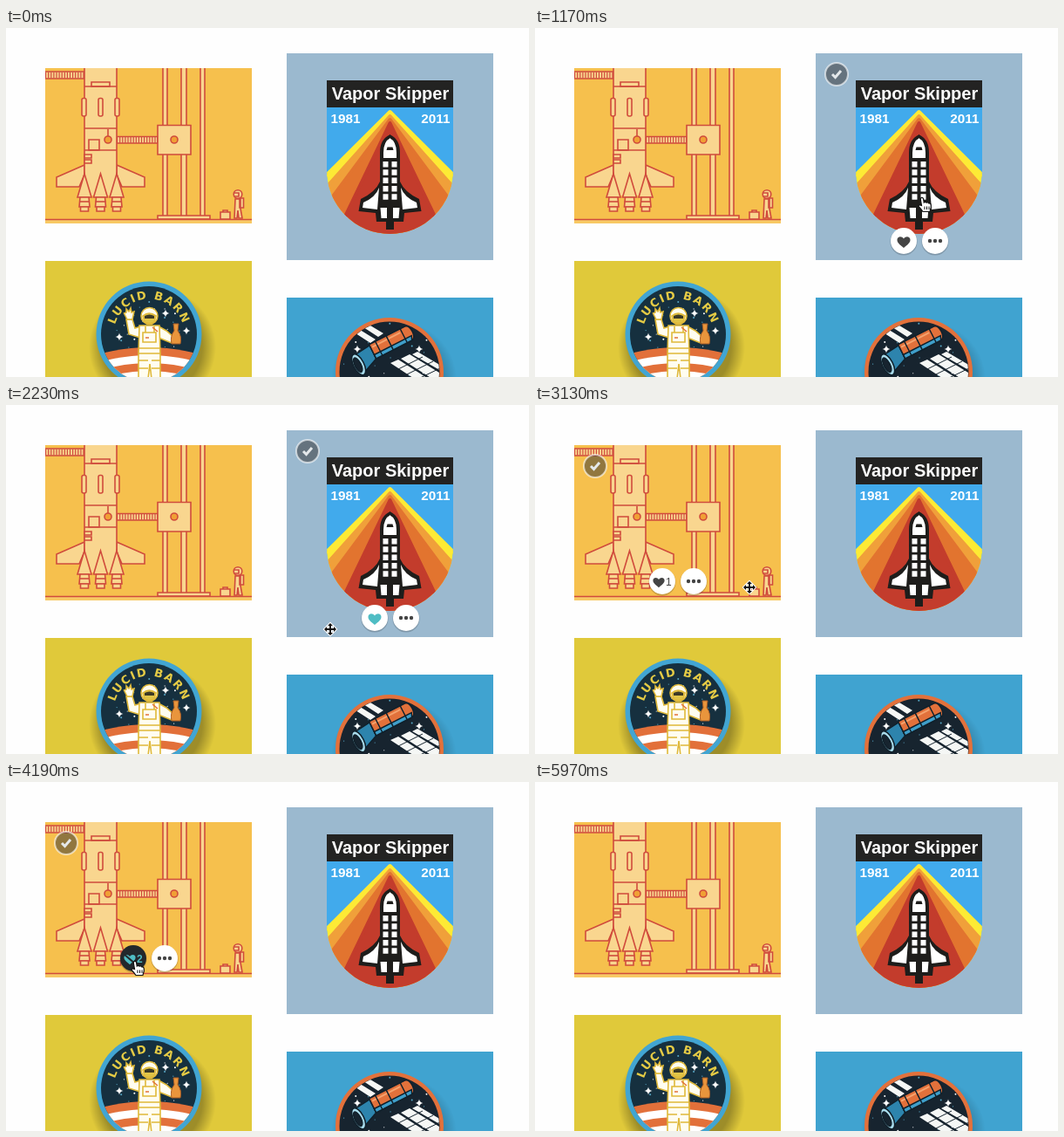
These frames come from a looping animation (600x400 px, 6320 ms). An HTML page:

```html
<!DOCTYPE html>
<html lang="en">
<head>
<meta charset="utf-8">
<title>Pin board</title>
<style>
html, body { margin: 0; height: 100%; overflow: hidden; background: #fefefe }
svg { display: block }
text { font-family: "Liberation Sans", Arial, sans-serif; font-weight: bold }
.wide { font-family: "DejaVu Sans", sans-serif }
.line { stroke: #d04b3c; stroke-width: 1.6; fill: #f9d68f }
.open { fill: none }
.suit { fill: #fffdf0; stroke: #dfb93a; stroke-width: 1.6 }
</style>
</head>
<body>
<svg width="600" height="400" viewBox="0 0 600 400">
<defs>
  <clipPath id="shield"><path d="M368 60H513V163A72.500 73 0 0 1 368 163Z"/></clipPath>
  <clipPath id="camp"><circle cx="164" cy="351" r="55"/></clipPath>
  <clipPath id="scope"><circle cx="440" cy="394" r="57"/></clipPath>
  <clipPath id="pad"><path d="M45 46H282V224H45Z"/></clipPath>
  <path id="arc" d="M123.500 351A40.500 40.500 0 0 1 204.500 351"/>
  <path id="star" d="M0-4.500Q.6-.6 4.500 0 .6.6 0 4.500-.6.6-4.500 0-.6-.6 0-4.500"/>
  <radialGradient id="shade"><stop offset=".78" stop-opacity=".3"/><stop offset="1" stop-opacity="0"/></radialGradient>
  <g id="engine" class="line">
    <path d="M0 167L-8 194H8Z"/><path d="M-5 194H5L6 205H-6Z"/><path d="M-4.500 205H4.500V210H-4.500Z"/>
    <path class="open" d="M-6 199H6"/>
  </g>
  <g id="side">
    <path fill="#1e1d1b" d="M441 122Q429 127 429 143V176Q424 188 407 196L404.500 210 424 212 425 222H436V231H441Z"/>
    <path fill="#fff" d="M441 126Q433 130 433 143V149H441ZM428 183Q424 194 410 200L409 206 426 208ZM429.500 206H437V218H430.500Z"/>
    <path fill="none" stroke="#fff" stroke-width="6" stroke-dasharray="6.500 2.800" d="M435.500 153V199"/>
  </g>
</defs>

<!-- launch pad -->
<g clip-path="url(#pad)">
  <path fill="#f6c04d" d="M45 46H282V224H45Z"/>
  <path fill="#f8c964" d="M45 220H282V224H45Z"/>
  <g class="line">
    <path d="M180 40H185V215H180ZM201 40H207V215H201ZM223 40H228V215H223ZM174 215H234V219H174Z"/>
    <path d="M40 50H90V58H40ZM127 124.500H174V132H127Z"/>
    <path class="open" stroke-width="7" stroke-dasharray="1.200 1.900" d="M45 54H90M127 128.300H174"/>
    <path d="M90 157L58 171V182H84L90 168ZM127 157L159 171V182H133L127 168Z"/>
    <path stroke="none" d="M90 160H127V192H90Z"/>
    <path d="M90 168V40H127V168"/>
    <path d="M98 62H119V67H98ZM95 128H107V140H95ZM90 145H98V149H90ZM90 151H98V155H90Z"/>
    <path class="open" d="M90 67H127M90 115H127M90 140H127M117 116V124"/>
    <rect x="87" y="80.500" width="5" height="20.500" rx="2"/><rect x="106" y="80.500" width="5" height="20.500" rx="2"/><rect x="125" y="80.500" width="5" height="20.500" rx="2"/>
    <path d="M174 111.500H212V145H174Z"/>
    <circle cx="117" cy="128" r="4" fill="#f0a035"/><circle cx="193" cy="128" r="4" fill="#f0a035"/>
    <path class="open" d="M45 219.500H282"/>
    <path d="M246 211H257V219H246ZM249 211V209H254V211"/>
    <path d="M268 195H272.500V206H268ZM263 196H269V207L271 218H267L266 209 265 218H262Z"/>
    <circle cx="266" cy="190.500" r="4.800"/><path class="open" d="M262 189H267V193H262"/>
  </g>
  <use href="#engine" x="90"/><use href="#engine" x="127"/><use href="#engine" x="108.500"/>
</g>

<!-- shield badge -->
<path fill="#9bb9cf" d="M322 29H559V266H322Z"/>
<g clip-path="url(#shield)">
  <path fill="#41aaec" d="M368 60H513V240H368Z"/>
  <g stroke-linejoin="round" stroke-width="4">
    <path fill="#fdea35" stroke="#fdea35" d="M440.500 96L360 176V250H521V176Z"/>
    <path fill="#f0a03a" stroke="#f0a03a" d="M440.500 101L360 191V250H521V191Z"/>
    <path fill="#e2742f" stroke="#e2742f" d="M440.500 105L360 213V250H521V213Z"/>
    <path fill="#c33c2c" stroke="#c33c2c" d="M440.500 109L378 239V250H503V239Z"/>
  </g>
  <path fill="#232322" d="M368 60H513V91H368Z"/>
</g>
<g fill="#fff">
  <text x="441" y="82" font-size="20" text-anchor="middle">Vapor Skipper</text>
  <text x="372.500" y="108.500" font-size="15.300">1981</text>
  <text x="509.500" y="108.500" font-size="15.300" text-anchor="end">2011</text>
</g>
<use href="#side"/><use href="#side" transform="translate(881)scale(-1 1)"/>
<path fill="#1e1d1b" d="M436.500 140L437.500 136.500H443.500L444.500 140Z"/>

<!-- camp badge -->
<path fill="#e0c93a" d="M45 267H282V400H45Z"/>
<ellipse cx="168" cy="366" rx="73" ry="70" fill="url(#shade)"/>
<circle cx="164" cy="351" r="60.500" fill="#42a5d2"/>
<circle cx="164" cy="351" r="55" fill="#16303f"/>
<g clip-path="url(#camp)">
  <g id="dots"></g>
  <g id="hills"></g>
</g>
<text class="wide" font-size="13" letter-spacing="1.600" fill="#e5cb45" text-anchor="middle"><textPath href="#arc" startOffset="50%">LUCID BARN</textPath></text>
<g fill="#fff"><use href="#star" x="130" y="354"/><use href="#star" x="183" y="327"/><use href="#star" x="207" y="347"/></g>
<g class="suit">
  <path d="M155 342L148 344 145 334H138L141 351 154 355ZM175 342L184 347 193 355 190 361 175 355Z"/>
  <path d="M139 334L135.500 327 138 326 138 322 141 325 143 321 144 326 147 325 145 334Z"/>
  <path d="M153 341H176L177 374V402H167L165 385 163 402H152V374Z"/>
  <path d="M157 349H172V360H157ZM153 367H176M152 373H177M152 381H163M167 381H177M152 390H163M167 390H177M160 342V349M170 342V349"/>
  <circle cx="164.500" cy="330" r="9.500"/>
  <path fill="#e0c548" d="M157 330Q164 324 172 330L170 337Q164 340 159 337Z"/>
  <path fill="#3d3a26" stroke="none" d="M159 330Q164.500 327 170 330V333H159Z"/>
</g>
<path stroke="#e2703a" stroke-width="1.500" d="M160 355H164M168 343L174 348"/>
<path fill="#e9953c" stroke="#a85d26" d="M192 339H198L197 347Q202 353 200 362H190Q188 353 193 347Z"/>

<!-- telescope badge -->
<path fill="#40a3d0" d="M322 309H559V400H322Z"/>
<ellipse cx="445" cy="402" rx="72" ry="67" fill="url(#shade)" opacity=".6"/>
<circle cx="440" cy="394" r="62" fill="#e2713b"/>
<circle cx="440" cy="394" r="57.500" fill="#17242f"/>
<g clip-path="url(#scope)">
  <g id="dots2"></g>
  <g fill="#f5f7f5">
    <path d="M398 348L403 344 424 357 418 361ZM407 341L413 338 433 350 427 354Z"/>
    <path d="M441 384L450 380 486 403H470ZM453 379L463 374 502 398 492 404ZM466 374L472 371 506 391V397Z"/>
  </g>
  <path stroke="#17242f" d="M450 391L478 377M460 397L490 382M471 403L500 389"/>
  <g transform="translate(442 360)rotate(-27)" stroke="#10202b" stroke-width="1.500">
    <path fill="#2d84ad" d="M-24-8L-42-6-46 18-24 9Z"/>
    <path fill="#e2713b" d="M-24-9H22Q27-8 27 0 27 8 22 9H-24Z"/>
    <path fill="#3f9fca" d="M-24 4H24L22 9H-24Z"/>
    <path fill="#f5a26d" stroke="none" d="M-22-6H14V-4H-22Z"/>
    <path fill="none" d="M-16-9V9M-2-9V9M16-9V9"/>
    <ellipse cx="-45" cy="6" rx="6" ry="13" fill="#a9dcec"/><ellipse cx="-46" cy="6" rx="3.500" ry="9" fill="#17242f"/>
  </g>
  <g fill="#fff"><use href="#star" x="474" y="368"/><use href="#star" x="403" y="368"/></g>
</g>

<g id="ui"></g>
</svg>
<script>
const TICK = 89, LOOP = 6320;
const $ = id => document.getElementById(id);

// Pointer tip by tick: [tick, x, y]
const path = [
  [6, 536, 1], [8, 490, 85], [10, 460, 146], [11, 460, 146], [13, 444, 194],
  [15, 425, 256], [20, 425, 256], [25, 372, 257], [33, 372, 257], [35, 246, 209],
  [38, 183, 204], [39, 183, 204], [42, 148, 205], [48, 148, 205], [50, 156, 141],
  [57, 156, 141], [58, 174, 157], [60, 255, 213], [61, 345, 280], [63, 485, 362],
  [65, 560, 397], [66, 560, 399]
];
const cards = [
  { x: 45, y: 46, h: 178, likes: 1, click: 46 },
  { x: 322, y: 29, h: 237, likes: 0, click: 15 },
  { x: 322, y: 309, h: 178, likes: 0, click: 99 }
];
const W = 237;

const cursors = {
  arrow: '<path fill="#111" stroke="#fff" d="M0 0V14L3.500 11 6 16 8 15 6 10H10Z"/>',
  hand: '<path fill="#fff" stroke="#111" stroke-width="1.200" d="M-1.800 1.500Q0-.8 1.500 1.500L2.200 6Q3.500 4.500 5 6.200 6.500 5 7.800 7 9.800 6.500 10.300 9V12Q9.500 14 9 16.500H1Q-1 13.500-4 10.500-4 8-.5 9.500Z"/><path stroke="#111" d="M3 10.500V14M5.500 10.500V14M8 10.500V14"/>',
  move: '<path fill="#111" stroke="#fff" stroke-width="2" paint-order="stroke" d="M0-7L3-4H1V-1H4V-3L7 0 4 3V1H1V4H3L0 7-3 4H-1V1H-4V3L-7 0-4-3V-1H-1V-4H-3Z"/>'
};

function pointer(n) {
  const i = path.findIndex(k => k[0] >= n);
  if (i < 0 || n < path[0][0]) return null;
  const b = path[i], a = path[i - 1] || b, f = (n - a[0]) / (b[0] - a[0] || 1);
  return [1, 2].map(j => a[j] + (b[j] - a[j]) * f);
}

const disc = (x, y, dark) =>
  `<circle cx="${x}" cy="${y + 1}" r="15.500" opacity=".18"/><circle cx="${x}" cy="${y}" r="15" fill="${dark ? '#23282c' : '#fff'}"/>`;

function controls(c, n, onHeart, onDots) {
  const mid = c.x + W / 2, y = c.y + c.h - 22, hx = mid - 17.5, dx = mid + 18.5;
  const liked = n >= c.click, count = c.likes && c.likes + liked;
  const ink = liked ? '#4fbdc4' : onHeart ? '#fff' : '#444';
  let s = `<g transform="translate(${c.x + 24} ${c.y + 24})"><circle r="13" fill="#333" fill-opacity=".52" stroke="#fff" stroke-opacity=".6" stroke-width="2"/>
    <path d="M-5 0L-1.500 3.500 5-4" fill="none" stroke="#e4e8ea" stroke-width="3"/></g>`;
  s += disc(hx, y, onHeart) + `<g transform="translate(${hx - (count ? 4 : 0)} ${y + 1})${count ? 'scale(.88)' : ''}">
    <path fill="${ink}" d="M0 7C-5 3-7.500 1-7.500-2.200-7.500-6.500-2-7 0-3.500 2-7 7.500-6.500 7.500-2.200 7.500 1 5 3 0 7"/>`;
  if (liked && onHeart && n > c.click) s += '<path d="M-7-6L7 6" stroke="#23282c" stroke-width="2.500"/>';
  s += '</g>';
  if (count) s += `<text x="${hx + 4}" y="${y + 5}" font-size="12" style="font-weight:${liked ? 700 : 400}" fill="${ink}">${count}</text>`;
  s += disc(dx, y, onDots);
  for (const d of [-6, 0, 6]) s += `<circle cx="${dx + d}" cy="${y}" r="2.200" fill="${onDots ? '#fff' : '#444'}"/>`;
  return s;
}

function scene(n) {
  const p = pointer(n);
  if (!p) return '';
  const [x, y] = p;
  const c = cards.find(c => x >= c.x && x < c.x + W && y >= c.y && y < c.y + c.h);
  let kind = 'arrow', s = '';
  if (c) {
    const near = d => Math.hypot(x - c.x - W / 2 - d, y - c.y - c.h + 22) < 15;
    const heart = near(-17.5), dots = near(18.5);
    kind = heart || dots || y < c.y + c.h - 40 ? 'hand' : 'move';
    s = controls(c, n, heart, dots);
  }
  return s + `<g transform="translate(${x} ${y})">${cursors[kind]}</g>`;
}

// Scattered stars and striped hills
function stars(id, cx, cy, r, count) {
  let s = '';
  for (let i = 1; i <= count; i++) {
    const a = i * 2.4, d = r * Math.sqrt(i / count);
    s += `<circle cx="${cx + d * Math.cos(a)}" cy="${cy + d * Math.sin(a)}" r="${i % 3 ? .6 : 1}" fill="${i % 2 ? '#fff' : '#57a9c8'}"/>`;
  }
  $(id).innerHTML = s;
}
stars('dots', 164, 350, 38, 40);
stars('dots2', 440, 390, 54, 40);
for (let i = 0; i < 5; i++)
  $('hills').innerHTML += `<circle cx="164" cy="576" r="${210 - i * 9}" fill="${i % 2 ? '#fff' : '#e2703a'}"/>`;

let last = -1;
function frame(now) {
  const n = Math.floor(now % LOOP / TICK);
  if (n !== last) $('ui').innerHTML = scene(last = n);
  requestAnimationFrame(frame);
}
requestAnimationFrame(frame);
</script>
</body>
</html>
```
